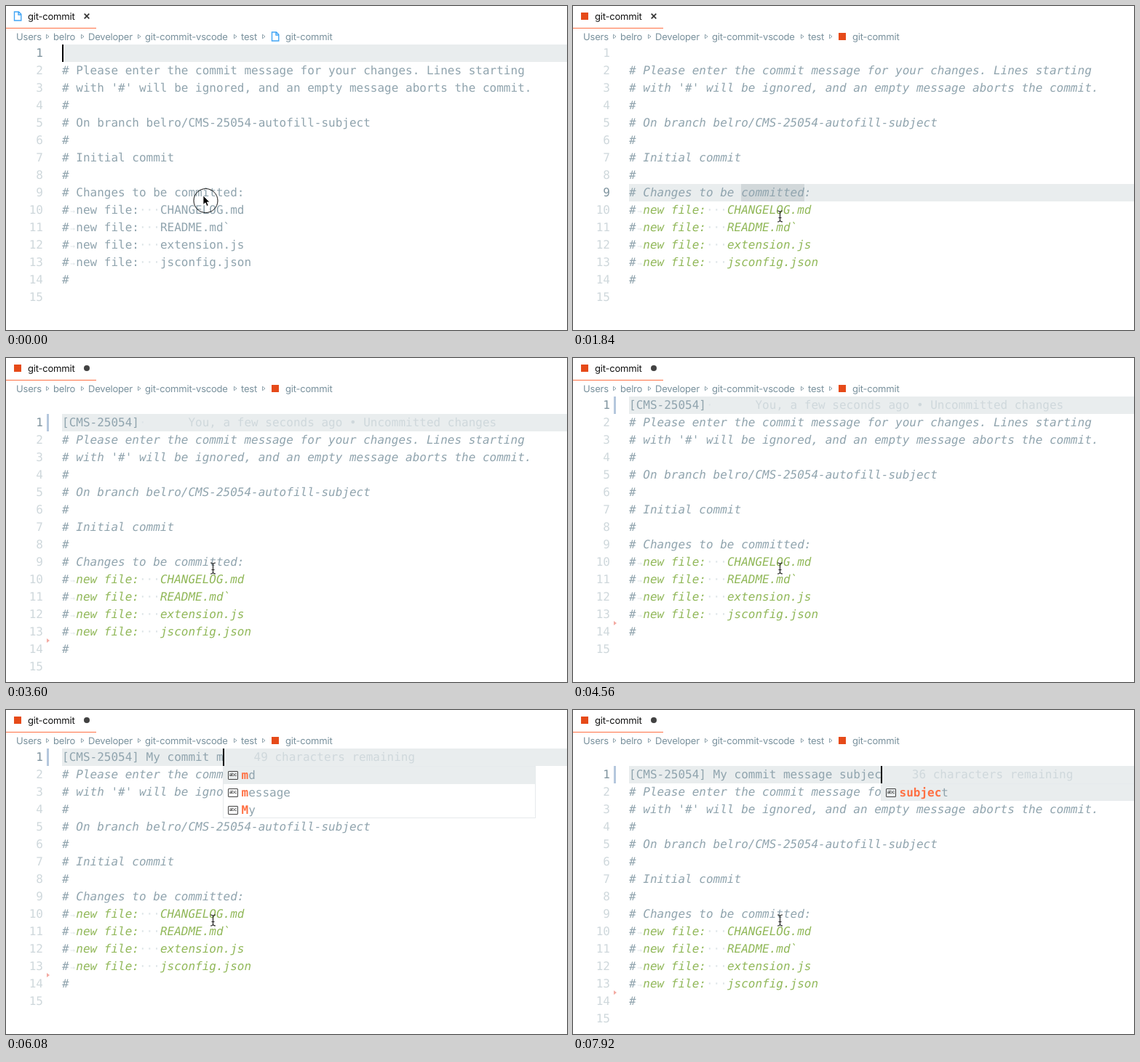
An HTML page that plays this animation: 771x446 px, repeating every 8000 ms.

```html
<!DOCTYPE html>
<html lang="en">
<head>
<meta charset="utf-8">
<title>Commit message editor</title>
<style>
  html, body { margin: 0; width: 771px; height: 446px; overflow: hidden; background: #fff; }
  body { position: relative; text-rendering: geometricPrecision; }
  #bar, #bar *, #editor, #editor > *, #mouse { position: absolute; }
  #bar { inset: 0 0 auto; height: 53px; font: 13px/20px Inter, "Open Sans", sans-serif; letter-spacing: -.2px; }
  #bar span { white-space: pre; color: #78909c; }
  #bar #title { color: #111; }
  #rule { left: 0; top: 30px; width: 124px; height: 1px; background: #ff7043; }
  .icon { width: 14px; height: 14px; }
  .icon rect { fill: #e64a19; }
  .icon path { fill: none; stroke: #42a5f5; stroke-width: 1.4; }
  .git path, .icon:not(.git) rect { display: none; }
  #editor { top: 53px; left: 0; right: 0; bottom: 0; overflow: hidden;
    font: 16px/24px "DejaVu Sans Mono", "Liberation Mono", monospace; color: #90a4ae; }
  #editor > * { white-space: pre; height: 24px; }
  .num { left: 0; width: 51px; text-align: right; color: #cfd8dc; }
  .num.on { color: #7e939e; }
  .text { left: 77px; }
  .it { font-style: italic; }
  .new { color: #91b859; }
  .ws { color: #dde4e7; font-style: normal; }
  .tab { display: inline-block; width: 1ch; font-size: 16px; vertical-align: top; text-align: center; }
  .tab i { font: 11px/24px "DejaVu Sans Mono", monospace; }
  .row { left: 77px; right: 0; background: #e9edee; }
  .word { background: #d2d8da; }
  .note { color: #cfd8dc; }
  .caret { width: 2px; background: #000; }
  .mark { left: 56px; width: 3px; background: #b5c7dd; }
  #editor > .cut { left: 55.5px; width: 0; height: 0; border: solid transparent; border-width: 3.5px 0 3.5px 4.5px; border-left-color: #f3aaa2; }
  #editor > .popup { box-sizing: border-box; width: 430px; background: #fff; border: 1px solid #e6eaec; overflow: hidden; }
  .popup div { position: relative; height: 24px; padding-left: 24.5px; }
  .popup div:first-child { background: #e9edee; }
  .popup b { color: #ff7043; }
  .abc { position: absolute; left: 6px; top: 6px; width: 12px; height: 10px; border: 1px solid #424242;
    border-radius: 1px; font: 6.5px/9px Inter, sans-serif; color: #222; text-align: center; letter-spacing: -.3px; }
  #mouse { left: 0; top: 0; width: 771px; height: 446px; }
</style>
</head>
<body>
<div id="bar">
  <span id="title" style="left:30px;top:5px">git-commit</span>
  <svg id="state" style="left:105px;top:8px" width="12" height="12">
    <path id="cross" d="M2.7 2.7l6.6 6.6M9.3 2.7l-6.6 6.6" stroke="#333" stroke-width="1.7"/>
    <circle id="dirty" cx="6" cy="6" r="4" fill="#424242"/>
  </svg>
  <div id="rule"></div>
</div>
<div id="editor"></div>
<svg id="mouse">
  <circle id="ring" cx="274.5" cy="268" r="16.5" fill="none" stroke="#111"/>
  <path id="arrow" d="M0 0V12.5L3 9.8L5 14.4L7.2 13.4L5.2 9H9Z" fill="#000" stroke="#fff" stroke-width=".8"/>
  <path id="beam" d="M-3.5 -7.5Q0 -7.5 0 -5Q0 -7.5 3.5 -7.5M0 -5V5M-3.5 7.5Q0 7.5 0 5Q0 7.5 3.5 7.5M-2 2H2" fill="none" stroke="#222" stroke-width="1.2"/>
</svg>
<script>
const LOOP = 8000, STEP = 80, ROW = 24, CH = 9.633, LEFT = 77;
const $ = id => document.getElementById(id);
const bar = $('bar'), editor = $('editor');

// Top bar
const add = html => bar.insertAdjacentHTML('beforeend', html);
const icon = (x, y) => add(`<svg class="icon" style="left:${x}px;top:${y}px"><rect x="2" y="2" width="10" height="10"/><path d="M2.5 1H8.5L11.8 4.3V13H2.5ZM8 1V5H11.8"/></svg>`);
icon(9, 7);
icon(363, 35);
[['Users', 14], ['belro', 65], ['Developer', 113], ['git-commit-vscode', 191], ['test', 323], ['git-commit', 384]]
  .forEach(([word, x]) => add(`<span style="left:${x}px;top:33px">${word}</span>`));
[54, 102, 180, 312, 351].forEach(x =>
  add(`<svg style="left:${x}px;top:37px" width="7" height="10"><path d="M1.5 2.2V7.8L5 5Z" fill="none" stroke="#90a4ae"/></svg>`));

const LINES = [
  'Please enter the commit message for your changes. Lines starting',
  "with '#' will be ignored, and an empty message aborts the commit.",
  '', 'On branch belro/CMS-25054-autofill-subject', '', 'Initial commit', '', 'Changes to be committed:',
  '+CHANGELOG.md', '+README.md`', '+extension.js', '+jsconfig.json', ''
];
const TICKET = '[CMS-25054] ';
const BLAME = 'You, a few seconds ago • Uncommitted changes';

// time, typed text, query, suggestions, optional remaining count
const TYPING = [
  [4720, 'M'],
  [4800, 'M', 'm', 'md message'],
  [4880, 'My'],
  [4960, 'My '],
  [5040, 'My c', 'c', 'commit committed changes Changes CHANGELOG CMS', 57],
  [5120, 'My c', 'c', 'commit committed changes Changes CHANGELOG CMS'],
  [5200, 'My co', 'co', 'commit committed CHANGELOG'],
  [5280, 'My com', 'co', 'commit committed CHANGELOG', 55],
  [5360, 'My com', 'com', 'commit committed'],
  [5440, 'My comm', 'comm', 'commit committed'],
  [5600, 'My commi', 'commi', 'commit committed'],
  [5680, 'My commit', 'commit', 'commit committed'],
  [5840, 'My commit ', 'commit', 'commit committed'],
  [5920, 'My commit '],
  [6080, 'My commit m', 'm', 'md message My'],
  [6160, 'My commit me', 'm', 'md message My', 49],
  [6240, 'My commit me', 'me', 'message'],
  [6320, 'My commit mes', 'me', 'message', 48],
  [6400, 'My commit mes', 'mes', 'message'],
  [6480, 'My commit mess', 'mes', 'message', 47],
  [6560, 'My commit mess', 'mess', 'message'],
  [6640, 'My commit messa', 'messa', 'message'],
  [6720, 'My commit messag', 'messa', 'message', 45],
  [6800, 'My commit messag', 'messag', 'message'],
  [6880, 'My commit message', 'message', 'message'],
  [6960, 'My commit message '],
  [7040, 'My commit message s', 's', 'starting subject'],
  [7520, 'My commit message sub', 'sub', 'subject'],
  [7680, 'My commit message subj', 'subj', 'subject'],
  [7760, 'My commit message subje', 'subje', 'subject'],
  [7920, 'My commit message subjec', 'subjec', 'subject']
];

const tag = (cls, body = '', style = '') => `<div class="${cls}" style="${style}">${body}</div>`;
const ws = s => `<span class="ws">${s}</span>`;
const within = (t, ...spans) => spans.some(([a, b]) => t >= a && t < b);
const colX = col => LEFT + col * CH;

function commentLine(s) {
  if (s[0] !== '+') return '# ' + s;
  const tab = '<span class="ws tab"><i>→</i></span>';
  return `#${tab}<span class="file">new file:${ws('···')}${s.slice(1)}</span>`;
}

function emphasize(word, query) {
  let k = 0;
  return [...word].map(c =>
    k < query.length && c.toLowerCase() === query[k] ? (k++, `<b>${c}</b>`) : c).join('');
}

function shiftAt(t) {
  if (within(t, [3440, 4160]) || t >= 7520) return ROW;
  if (!within(t, [4160, 4560])) return 0;
  return Math.round(ROW * (1 - (t - 4080) / 480));
}

function drawEditor(t) {
  const styled = t >= 320, shift = shiftAt(t);
  const current = within(t, [400, 3040]) ? 9 : 1;
  const top = line => shift + (line - 1) * ROW;
  const at = (line, x) => `top:${top(line)}px;` + (x === undefined ? '' : `left:${x}px`);
  const step = TYPING.filter(s => s[0] <= t).pop();
  const typed = step ? step[1] : '';
  const subject = t >= 2800 ? TICKET + typed : '';
  const caretX = current === 9 ? colX(20) : colX(subject.length);

  let html = tag('row', '', at(current));
  if (within(t, [480, 2800])) html += tag('word', '', at(9, 231) + ';width:87px');
  for (let n = 1; n <= 15; n++) html += tag(n === current ? 'num on' : 'num', n, at(n));
  html += tag('text', subject.replace(/ $/, ws('·')), at(1));
  LINES.forEach((s, i) => {
    const body = commentLine(s).replace('class="file"', styled ? 'class="new"' : '');
    html += tag(styled ? 'text it' : 'text', body, at(i + 2));
  });

  if (t >= 3520) {
    html += tag('mark', '', at(1));
    html += tag('cut', '', `top:${top(14) - 3.5}px`);
  }
  if (step) {
    const left = step[4] || 72 - subject.length;
    html += tag('note', left + ' characters remaining', at(1, caretX + 42));
  } else if (t >= 3600) {
    html += tag('note', BLAME, at(1, colX(18)));
  }

  const caretOn = step || within(t, [0, 880], [1360, 1840], [2320, 2800], [3040, 3440], [3920, 4400]);
  if (step && step[3]) {
    const words = step[3].split(' ');
    const rows = words.map(w => `<div><span class="abc">abc</span>${emphasize(w, step[2])}</div>`).join('');
    html += tag('popup', rows, at(2, Math.floor(caretX)) + `;height:${words.length * ROW}px`);
  }
  if (caretOn) html += tag('caret', '', at(current, Math.floor(caretX)));
  editor.innerHTML = html;
}

const show = (id, on) => { $(id).style.display = on ? '' : 'none'; };

function drawMouse(t) {
  const p = Math.min(1, Math.max(0, (t - 240) / 400));
  show('ring', t < 80);
  show('arrow', t < 320);
  show('beam', t >= 320);
  $('arrow').setAttribute('transform', 'translate(271 261)');
  $('beam').setAttribute('transform', `translate(${271 + 13.5 * p} ${264 + 25.5 * p})`);
}

let last = -1;
function frame() {
  const t = Math.floor(performance.now() % LOOP / STEP) * STEP;
  if (t !== last) {
    last = t;
    document.querySelectorAll('.icon').forEach(el => el.classList.toggle('git', t >= 320));
    show('cross', t < 2800);
    show('dirty', t >= 2800);
    drawEditor(t);
    drawMouse(t);
  }
  requestAnimationFrame(frame);
}
frame();
</script>
</body>
</html>
```
